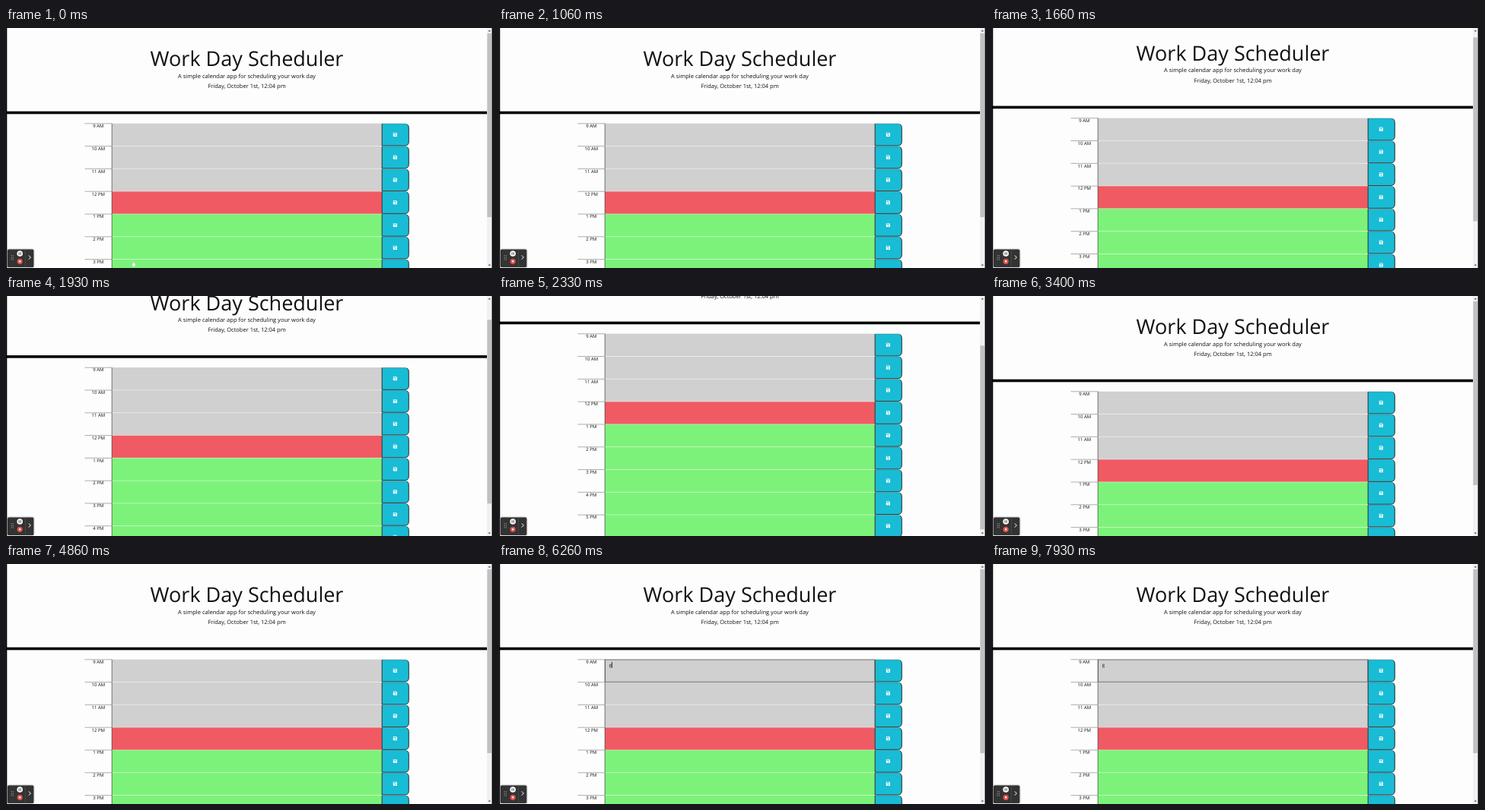
Recreate the animation shown at these times as an HTML page. Size 640x316 px, loop 8000 ms.

```html
<!DOCTYPE html>
<html lang="en">
<head>
<meta charset="utf-8">
<title>Work Day Scheduler</title>
<style>
@property --scroll { syntax: "<number>"; inherits: true; initial-value: 0; }
html, body { margin: 0; width: 100%; height: 100%; overflow: hidden; background: #fdfdfd; }
svg { display: block; width: 640px; height: 316px; font-family: "Open Sans", sans-serif; fill: #111; animation: scroll 8s linear infinite; }
text { text-rendering: geometricPrecision; }
#page { transform: translateY(calc(var(--scroll) * -1px)); }
#thumb { transform: translateY(calc(var(--scroll) * 0.7665px)); }
#recorder { filter: drop-shadow(0 0 1px #0006); }
.mid { text-anchor: middle; }
.hour { font-size: 6px; }
.lead { font-size: 7.5px; }
.past { fill: #d0d0d0; }
.present { fill: #f05a63; }
.future { fill: #7df27a; }
.save { fill: #18bcd4; stroke: #4a7f88; stroke-width: .6; }
.edge { fill: none; stroke: #222; stroke-width: .8; }
.hand { animation: hand 8s step-end infinite; }
.focus { animation: focus 8s step-end infinite; }
.typed { animation: typed 8s step-end infinite; }
.caret { animation: caret 8s step-end infinite; }

@keyframes scroll {
  0%, 19.125% { --scroll: 0; }
  20.75% { --scroll: 7; }
  24.125% { --scroll: 31.5; }
  29.125% { --scroll: 76; }
  30%, 35% { --scroll: 78; }
  41.25%, 100% { --scroll: 0; }
}
@keyframes hand {
  0% { opacity: 1; }
  5%, 100% { opacity: 0; }
}
@keyframes focus {
  0% { opacity: 0; }
  68.5%, 100% { opacity: 1; }
}
@keyframes typed {
  0% { opacity: 0; }
  77.5%, 100% { opacity: 1; }
}
@keyframes caret {
  0% { opacity: 0; transform: translateX(-3.4px); }
  68.5% { opacity: 1; transform: translateX(-3.4px); }
  75.1% { opacity: 0; transform: translateX(-3.4px); }
  77.5% { opacity: 1; transform: none; }
  84.1% { opacity: 0; transform: none; }
  90.75% { opacity: 1; transform: none; }
  97.4%, 100% { opacity: 0; transform: none; }
}
</style>
</head>
<body>
<svg viewBox="0 0 640 316">
  <defs>
    <g id="disk">
      <path d="M-2.6-2q0-.6.6-.6H1.4L2.6-1.4V2q0 .6-.6.6H-2q-.6 0-.6-.6z" fill="#fff"/>
      <path d="M-1.8-1.9H1V-.6H-1.8z" fill="#18bcd4"/>
      <circle cy="1.1" r=".8" fill="#18bcd4"/>
    </g>
  </defs>
  <rect width="640" height="316" fill="#fdfdfd"/>

  <g id="page">
    <text class="mid" x="316.5" y="50.4" font-size="27">Work Day Scheduler</text>
    <text class="mid lead" x="316.5" y="65.5">A simple calendar app for scheduling your work day</text>
    <text class="mid lead" x="316.5" y="78.8">Friday, October 1st, 12:04 pm</text>
    <rect y="109.7" width="632" height="3.6" fill="#000"/>
    <g id="rows"></g>
    <rect class="focus" x="139.4" y="126" width="354.6" height="29.2" fill="none" stroke="#555" stroke-width=".8"/>
    <text class="hour typed" x="144.8" y="134.9">g</text>
    <rect class="caret" x="148.1" y="128.8" width=".8" height="7.8"/>
  </g>

  <g class="hand">
    <path d="M166.2 307.4q.7-.8 1.3 0v2l2.1.4q.7.2.6 1l-.4 2.3-.8 1.1h-2.2l-1.6-2.2q-.3-.8.4-.8l.6.4z" fill="#fff" stroke="#6aa868" stroke-width=".3"/>
  </g>

  <rect width="1.3" height="316" fill="#000"/>
  <rect x="632" width="6.6" height="316" fill="#f1f1f1"/>
  <rect id="thumb" x="632.4" y="7" width="5.6" height="242" fill="#c1c1c1"/>
  <path d="M633.6 4.6l1.7-2 1.7 2zM633.6 311.4l1.7 2 1.7-2z" fill="#505050"/>
  <rect x="638.6" width="1.4" height="316" fill="#000"/>

  <g id="recorder">
    <rect x="2" y="291.4" width="34.4" height="23.6" rx="1.5" fill="#333"/>
    <g id="grip" fill="#aaa"></g>
    <circle cx="18.2" cy="297" r="3.8" fill="#fff"/>
    <path d="M17.1 295.3v3.4M19.3 295.3v3.4" stroke="#333" stroke-width=".9"/>
    <circle cx="18.2" cy="307.3" r="3.6" fill="#e0504c"/>
    <rect x="17.1" y="306.2" width="2.2" height="2.2" fill="#fff"/>
    <path d="M25.4 291.9v22.6" stroke="#555" stroke-width=".6"/>
    <path d="M29.8 299.4l2.6 2.6-2.6 2.6" fill="none" stroke="#fff" stroke-width="1"/>
  </g>
</svg>
<script>
const TOP = 125.7, STEP = 29.8, NOW = 12;

function row(hour) {
  const y = TOP + (hour - 9) * STEP;
  const label = `${hour > 12 ? hour - 12 : hour} ${hour < 12 ? "AM" : "PM"}`;
  const tense = hour < NOW ? "past" : hour > NOW ? "future" : "present";
  const line = hour > 9 ? `<path d="M139 ${y}H494" stroke="#fff" stroke-opacity=".6" stroke-width=".6"/>` : "";
  return `<rect class="${tense}" x="139" y="${y}" width="355" height="${STEP}"/>${line}
    <path d="M103.5 ${y + .1}H139" stroke="#777" stroke-width=".6"/>
    <path d="M139.2 ${y}v${STEP}" stroke="#444" stroke-width=".7"/>
    <text class="mid hour" x="121.3" y="${y + 5.4}">${label}</text>
    <path class="save" d="M494.2 ${y + .4}h29.7q5.4 0 5.4 5.4v18.1q0 5.4-5.4 5.4h-29.7z"/>
    <path class="edge" d="M494.2 ${y + .4}v28.9h29.7q5.4 0 5.4-5.4v-18.1q0-3.6-2.4-4.8"/>
    <use href="#disk" x="511.4" y="${y + 14.6}"/>`;
}

const hours = Array.from({ length: 9 }, (_, i) => i + 9);
document.getElementById("rows").innerHTML = hours.map(row).join("");
document.getElementById("grip").innerHTML = Array.from({ length: 6 }, (_, i) =>
  `<circle cx="${7.2 + i % 2 * 2.2}" cy="${299.8 + (i >> 1) * 2.5}" r=".65"/>`).join("");
</script>
</body>
</html>
```
